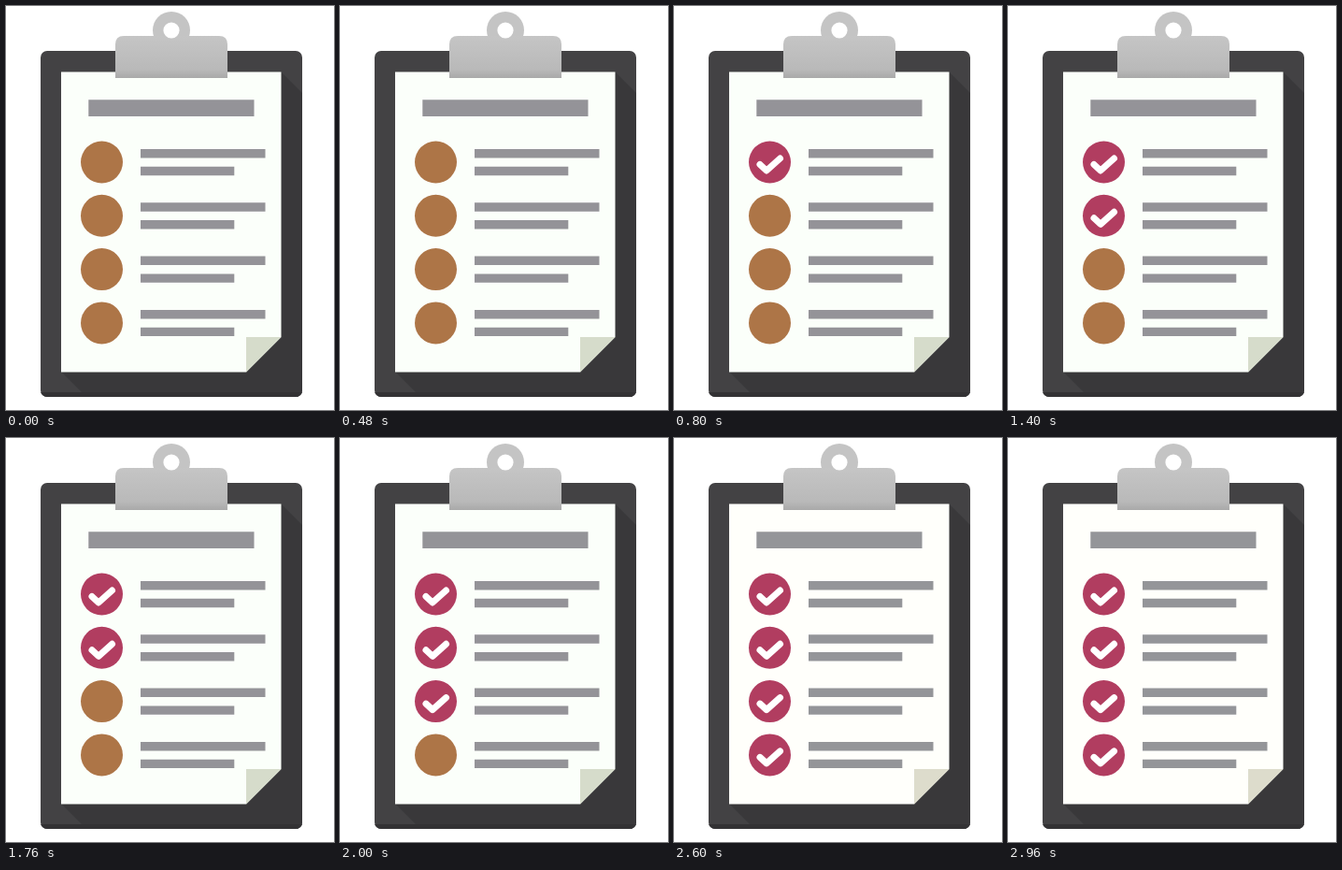
Write an HTML page that moves like this. It is 351 by 432 pixels and loops after 3.2 s.

```html
<!DOCTYPE html>
<html lang="en">
<head>
<meta charset="utf-8">
<title>Checklist</title>
<style>
  html, body { margin: 0; width: 100%; height: 100%; overflow: hidden; background: #fff; }
  svg { display: block; width: 100%; height: 100%; }
  .paper { fill: #fbfffa; }
  .fold { fill: #d6dccb; }
  .bar { fill: #949398; }
  .dot { fill: #ad7547; }
  .check { fill: none; stroke: #fff; stroke-width: 7; stroke-linecap: round; stroke-linejoin: round; visibility: hidden; }
  .done .dot { fill: #b13d60; }
  .done .check { visibility: visible; }
  .complete .paper { fill: #fffffb; }
  .complete .fold { fill: #dddccc; }
  .complete .bar { fill: #949599; }
</style>
</head>
<body>
<svg id="stage" viewBox="0 0 351 432">
  <defs>
    <clipPath id="board"><rect x="37" y="48" width="280" height="370" rx="7"/></clipPath>
    <linearGradient id="metal" x1="0" y1="0" x2="0" y2="1">
      <stop offset="0" stop-color="#c5c5c5"/>
      <stop offset=".8" stop-color="#b9b9b9"/>
      <stop offset="1" stop-color="#a9a9a9"/>
    </linearGradient>
    <g id="row">
      <circle class="dot" cx="102.5" cy="167" r="22.5"/>
      <path class="check" d="M92 169.5l7 6.5 14.5-13"/>
      <path class="bar" d="M144 153h133.5v9.5H144zM144 171.8h100.3v9.4H144z"/>
    </g>
  </defs>
  <g clip-path="url(#board)">
    <path fill="#434244" d="M37 48h280v370H37z"/>
    <path fill="#39383a" d="M294 70l23 23v325H86l-27-27z"/>
    <path fill="#333234" d="M37 413h280v5H37z"/>
  </g>
  <path class="paper" d="M59 70.5h235.5V354L257 391.5H59z"/>
  <path class="fold" d="M257 354h37.5L257 391.5z"/>
  <path class="bar" d="M88.3 100.3h177.2V118H88.3z"/>
  <g id="rows"></g>
  <circle cx="177" cy="26" r="20" fill="#c4c4c4"/>
  <path fill="url(#metal)" d="M117 77V41q0-9 9-9h102q9 0 9 9v36z"/>
  <circle cx="177" cy="26" r="8.6" fill="#fff"/>
</svg>
<script>
  const LOOP = 3200, FIRST = 800, STEP = 600, ROWS = 4, PITCH = 57.3;
  const stage = document.getElementById('stage');
  const list = document.getElementById('rows');
  const template = document.getElementById('row');

  const rows = Array.from({ length: ROWS }, (_, i) => {
    const row = template.cloneNode(true);
    row.removeAttribute('id');
    row.setAttribute('transform', `translate(0 ${i * PITCH})`);
    return list.appendChild(row);
  });

  function draw(now) {
    const t = now % LOOP;
    const checked = Math.floor((t - FIRST) / STEP) + 1;
    rows.forEach((row, i) => row.classList.toggle('done', i < checked));
    stage.classList.toggle('complete', checked >= ROWS);
  }

  const start = performance.now();
  function tick() {
    draw(performance.now() - start);
    requestAnimationFrame(tick);
  }
  tick();
</script>
</body>
</html>
```
